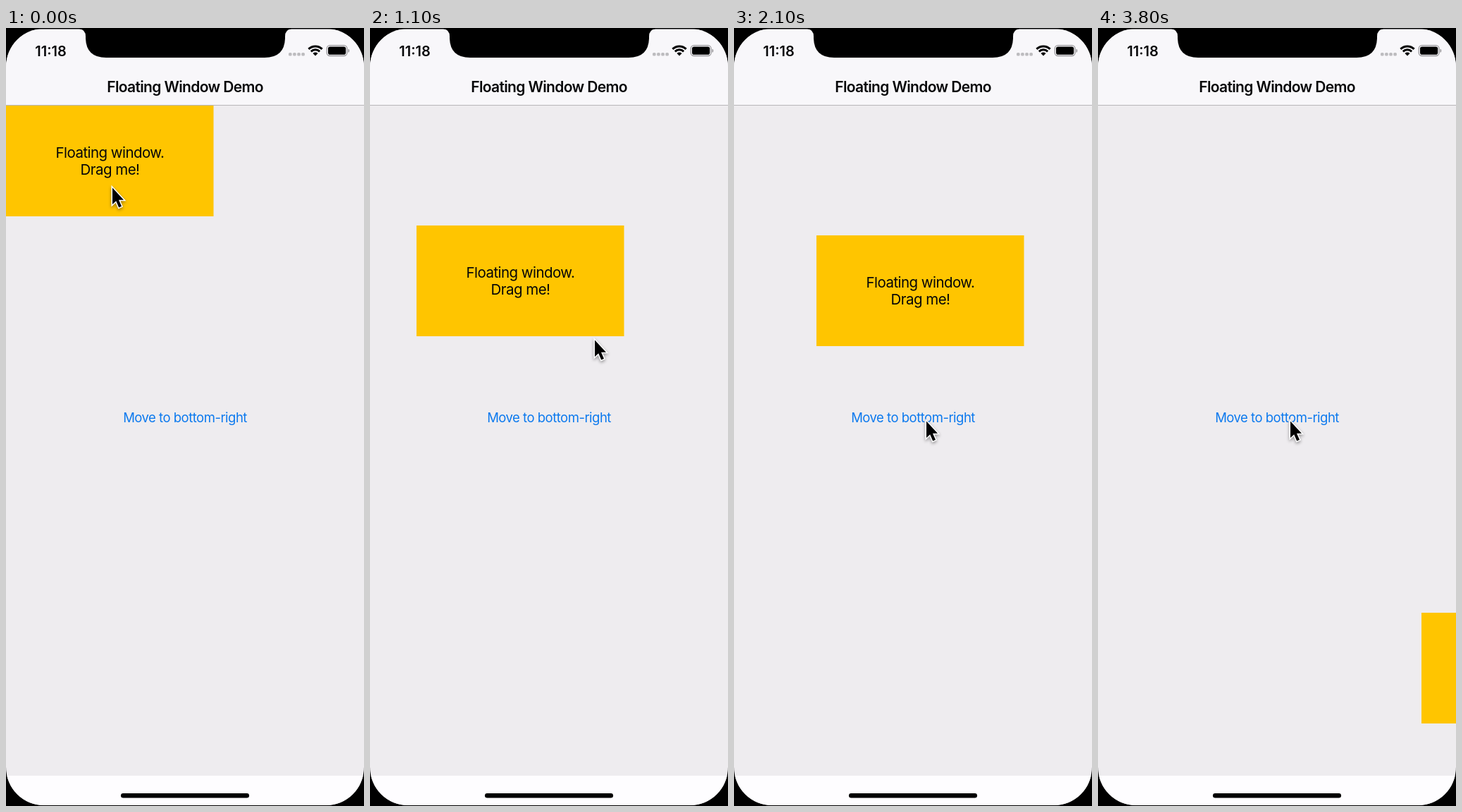
Animation, 508 px wide and 1103 px high, one loop 3900 ms. Source, as an HTML page with a canvas:

```html
<!DOCTYPE html>
<html lang="en">
<head>
<meta charset="utf-8">
<title>Floating Window Demo</title>
<style>
  html, body { margin: 0; width: 100%; height: 100%; overflow: hidden; background: #000; }
  canvas { display: block; width: 508px; height: 1103px; }
</style>
</head>
<body>
<canvas id="stage" width="508" height="1103"></canvas>
<script>
const W = 508, H = 1103, LOOP = 3900, STEP = 100;
const ctx = document.getElementById('stage').getContext('2d');
const INK = '#060608';

// Waypoints are 200 ms apart, starting at 500 ms.
const PATH_START = 500, PATH_STEP = 200;
const windowPath = [[0, 110], [0, 114], [5, 180], [66, 280], [129, 336.5], [180, 338], [130, 303], [117, 294]];
const cursorPath = [[150, 224], [157, 250], [245, 367], [318, 440], [343, 454], [315, 432], [272, 411], [267, 440], [272, 555]];
const DOCK = [459, 829];

const clamp = (v, lo = 0, hi = 1) => Math.min(hi, Math.max(lo, v));
const mix = (a, b, p) => a + (b - a) * p;

function along(path, time) {
  const last = path.length - 1;
  const u = clamp((time - PATH_START) / PATH_STEP, 0, last);
  const i = Math.min(Math.floor(u), last - 1), s = u - i;
  const at = k => path[clamp(k, 0, last)];
  return [0, 1].map(axis => {
    const [a, b, c, d] = [-1, 0, 1, 2].map(k => at(i + k)[axis]);
    return b + s * (c - a + s * (2 * a - 5 * b + 4 * c - d + s * (3 * (b - c) + d - a))) / 2;
  });
}

// cubic-bezier(.42, 0, .58, 1)
function easeInOut(x) {
  let lo = 0, hi = 1;
  for (let i = 0; i < 20; i++) {
    const m = (lo + hi) / 2;
    const bx = 3 * m * (1 - m) * (0.42 * (1 - m) + 0.58 * m) + m ** 3;
    if (bx < x) lo = m; else hi = m;
  }
  return lo * lo * (3 - 2 * lo);
}

function windowAt(time) {
  const [x, y] = along(windowPath, time);
  const p = easeInOut(clamp((time - 2280) / 605));
  return [mix(Math.max(0, x), DOCK[0], p), mix(y, DOCK[1], p)];
}

function linkAlpha(time) {
  if (time < 2300) return mix(1, 0.25, clamp((time - 2150) / 150));
  return mix(0.25, 1, clamp((time - 2300) / 270));
}

function rect(x, y, w, h, color) {
  ctx.fillStyle = color;
  ctx.fillRect(x, y, w, h);
}

function pill(x, y, w, h, r, color) {
  ctx.fillStyle = color;
  ctx.beginPath();
  ctx.roundRect(x, y, w, h, r);
  ctx.fill();
}

function label(text, x, y, size, weight, tracking, color = INK) {
  ctx.font = `${weight} ${size}px Inter, "Liberation Sans", sans-serif`;
  ctx.letterSpacing = tracking + 'px';
  ctx.textAlign = 'center';
  ctx.fillStyle = color;
  ctx.fillText(text, x, y);
}

function drawNotch() {
  ctx.fillStyle = '#000';
  ctx.fill(new Path2D('M0 0H508V1.5H405Q396 2 396 12V15Q395 42 367 42H142Q114 42 113 15V12Q113 2 104 1.5H0Z'));
}

function drawWifi(x, y) {
  const from = -Math.PI * 0.75, to = -Math.PI * 0.25;
  ctx.strokeStyle = ctx.fillStyle = '#000';
  ctx.lineWidth = 3;
  for (const r of [8.7, 13.6]) {
    ctx.beginPath();
    ctx.arc(x, y, r, from, to);
    ctx.stroke();
  }
  ctx.beginPath();
  ctx.moveTo(x, y);
  ctx.arc(x, y, 5, from, to);
  ctx.fill();
}

function drawStatusBar() {
  label('11:18', 63.5, 39.5, 20, 600, 0);
  for (let i = 0; i < 4; i++) pill(401 + i * 6.1, 35, 4.6, 4.6, 1.6, '#bdbcbf');
  drawWifi(439, 39.5);
  ctx.strokeStyle = '#99989b';
  ctx.lineWidth = 1.3;
  ctx.beginPath();
  ctx.roundRect(455.2, 24.7, 28.8, 14.8, 4.5);
  ctx.stroke();
  pill(457, 26.5, 25.2, 11.2, 2.8, '#000');
  pill(485.5, 29.7, 1.7, 5, [0, 2, 2, 0], '#99989b');
}

function drawWindow([x, y]) {
  rect(x, y, 294.5, 157, '#ffc500');
  label('Floating window.', x + 147.5, y + 73.5, 20.5, 400, -0.55);
  label('Drag me!', x + 147.5, y + 98, 20.5, 400, -0.55);
}

const arrow = new Path2D('M0 0V23.5L5.2 18.7L9.2 28L13 26.3L9 17.2H16Z');

function drawCursor([x, y]) {
  ctx.save();
  ctx.translate(x + 1, y + 2.5);
  ctx.lineWidth = 3;
  ctx.strokeStyle = '#fff';
  ctx.shadowColor = 'rgba(0,0,0,.4)';
  ctx.shadowBlur = 4;
  ctx.shadowOffsetY = 2;
  ctx.stroke(arrow);
  ctx.shadowColor = 'transparent';
  ctx.fillStyle = '#000';
  ctx.fill(arrow);
  ctx.restore();
}

function draw(time) {
  rect(0, 0, W, H, '#000');
  ctx.save();
  ctx.beginPath();
  ctx.roundRect(0, 1, W, H - 2, 54);
  ctx.clip();
  rect(0, 0, W, H, '#eeecef');
  rect(0, 0, W, 109, '#f8f7fa');
  rect(0, 109, W, 1, '#b7b6b9');
  rect(0, 1060, W, 43, '#fefdff');
  drawWindow(windowAt(time));
  ctx.globalAlpha = linkAlpha(time);
  label('Move to bottom-right', 254, 558.5, 18.5, 400, -0.5, '#0b79ee');
  ctx.globalAlpha = 1;
  label('Floating Window Demo', 254, 90.5, 21, 600, -0.65);
  drawStatusBar();
  pill(163, 1085, 182, 6.5, 3.25, '#000');
  ctx.restore();
  drawNotch();
  drawCursor(along(cursorPath, time));
}

function tick() {
  const time = performance.now() % LOOP;
  draw(Math.floor(time / STEP) * STEP);
  requestAnimationFrame(tick);
}
tick();
</script>
</body>
</html>
```
